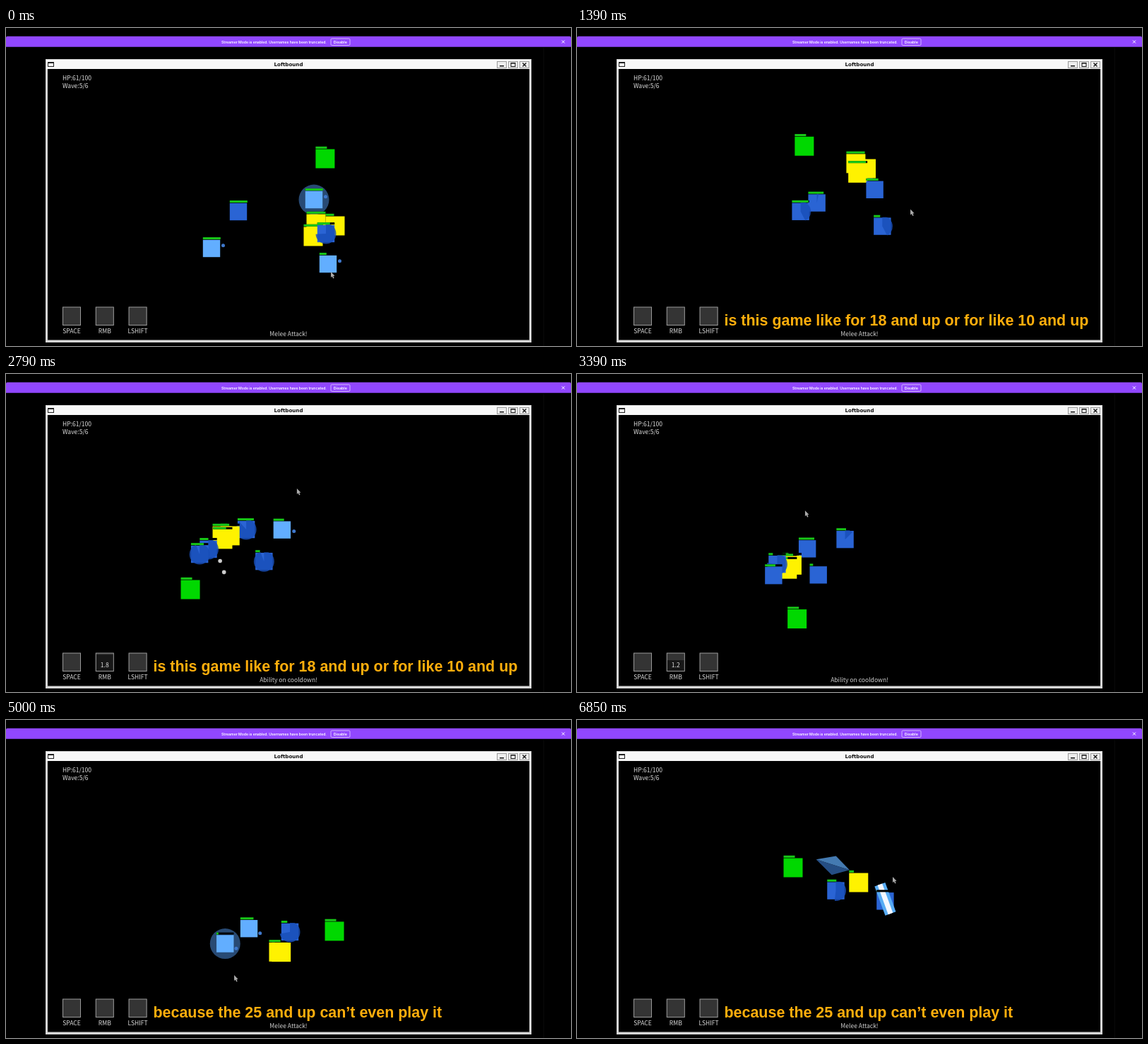
Recreate the animation shown at these times as an HTML page with a canvas. Size 800x450 px, loop 6880 ms.

```html
<!DOCTYPE html>
<html lang="en">
<head>
<meta charset="utf-8">
<title>Arena fight</title>
<style>
html, body { margin: 0; width: 100%; height: 100%; overflow: hidden; background: #000; }
canvas { display: block; width: 800px; height: 450px; }
</style>
</head>
<body>
<canvas id="stage" width="800" height="450"></canvas>
<script>
const ctx = document.getElementById('stage').getContext('2d');
const LOOP = 6880, STEP = 10;
const HUD = '8.55px "Noto Sans CJK JP", "Noto Sans CJK SC", "Noto Sans", sans-serif';
const BLUE = '#2a64d4', LIGHT = '#62aeff', YELLOW = '#fff200', GREEN = '#00d800';

// Attack cycle of a blue enemy: fire, reload, advance, halt. Times in ms.
const CYCLE = 5050, FIRE = 500, RELOAD = 2700, HALT = 4500;
const STAGGER = 700;
const CAST = 2620, COOLDOWN = 2000;
const SWING_EVERY = 990, SWING_TIME = 130;

// Steered by hand: time and centre.
const player = [[0, 452, 185], [910, 372, 143], [1940, 273, 215], [2790, 261, 305],
  [4120, 389, 371], [5000, 465, 299], [5900, 460, 190], [6850, 306, 209]];
const mouse = [[0, 460, 345], [910, 473, 303], [1940, 462, 202], [2790, 412, 162],
  [4120, 234, 256], [5000, 323, 361], [6850, 447, 222]];

// Enemies chase the player from a start point, losing health until they die at `end`.
const yellow = (x, y, hp, end) => ({ x, y, hp, end, size: 27, speed: .074 });
const blue = (x, y, hp, end, offset) => ({ x, y, hp, end, offset, size: 24.4, speed: .052 });
const enemies = [
  blue(436, 243, 25, 9900, 100),
  yellow(466, 280, 12, 6300),
  yellow(439, 277, 27, 7900),
  yellow(435, 295, 27, 4900),
  blue(329, 260, 25, 3900, 4240),
  blue(291, 312, 25, 5300, 250),
  blue(453, 291, 18, LOOP, 2500),
  blue(456, 334, 10, 4700, 250)
];
const captions = [
  [450, 3350, 'is this game like for 18 and up or for like 10 and up'],
  [4500, LOOP, 'because the 25 and up can’t even play it']
];

// Smooth curve through the key points.
function along(keys, t) {
  let i = 0;
  while (i < keys.length - 2 && t >= keys[i + 1][0]) i++;
  const d = keys[i + 1][0] - keys[i][0], u = Math.min(1, (t - keys[i][0]) / d), w = 1 - u;
  const slope = (j, axis) => {
    const a = keys[Math.max(j - 1, 0)], b = keys[Math.min(j + 1, keys.length - 1)];
    return (b[axis] - a[axis]) / (b[0] - a[0]);
  };
  return [1, 2].map(axis =>
    keys[i][axis] * w * w * (1 + 2 * u) + keys[i + 1][axis] * u * u * (3 - 2 * u)
    + d * u * w * (slope(i, axis) * w - slope(i + 1, axis) * u));
}

const clock = (e, t) => (t + e.offset) % CYCLE;

function isStill(e, t) {
  if (t > e.end - STAGGER) return true;
  return 'offset' in e && (clock(e, t) < FIRE || clock(e, t) > HALT);
}

for (const e of enemies) {
  let { x, y } = e;
  e.path = [];
  for (let t = 0; t < LOOP; t += STEP) {
    e.path.push([x, y]);
    if (isStill(e, t)) continue;
    const [px, py] = along(player, t);
    const move = e.speed * STEP / Math.hypot(px - x, py - y);
    x += (px - x) * move;
    y += (py - y) * move;
  }
}

function rect(x, y, w, h, color) {
  ctx.fillStyle = color;
  ctx.fillRect(x, y, w, h);
}

function square(x, y, size, color) {
  rect(x - size / 2, y - size / 2, size, size, color);
}

function outline(x, y, w, h, color) {
  ctx.strokeStyle = color;
  ctx.strokeRect(x, y, w, h);
}

function circle(x, y, r, color) {
  ctx.fillStyle = color;
  ctx.beginPath();
  ctx.arc(x, y, r, 0, 7);
  ctx.fill();
}

function poly(points, color) {
  ctx.fillStyle = color;
  ctx.beginPath();
  points.forEach(p => ctx.lineTo(...p));
  ctx.fill();
}

function cross(x, y, r, color) {
  ctx.strokeStyle = color;
  ctx.beginPath();
  for (const s of [-r, r]) {
    ctx.moveTo(x - r, y - s);
    ctx.lineTo(x + r, y + s);
  }
  ctx.stroke();
}

function text(str, x, y, font, color, align = 'left') {
  ctx.font = font;
  ctx.fillStyle = color;
  ctx.textAlign = align;
  ctx.fillText(str, x, y);
}

function placed(x, y, angle, paint) {
  ctx.save();
  ctx.translate(x, y);
  ctx.rotate(angle);
  paint();
  ctx.restore();
}

function healthBar(x, y, size, width) {
  const left = x - size / 2, top = y - size / 2 - 3.7;
  rect(left, top, size, 3, '#000');
  rect(left, top, width, 3, '#18c818');
}

function drawBanner() {
  ctx.fillStyle = '#9147ff';
  ctx.beginPath();
  ctx.roundRect(0, 11.7, 800, 15, [2, 2, 0, 0]);
  ctx.fill();
  text('Streamer Mode is enabled. Usernames have been truncated.', 379.5, 21.7, '600 5.1px Inter, sans-serif', '#fff', 'center');
  text('Disable', 473.3, 21.7, '600 5.4px Inter, sans-serif', '#fff', 'center');
  ctx.lineWidth = .8;
  ctx.strokeStyle = '#e4d4ff';
  ctx.beginPath();
  ctx.roundRect(460, 15, 27, 9.5, 1.5);
  ctx.stroke();
  ctx.lineWidth = 1;
  cross(789, 19.5, 2, '#fff');
}

function drawWindow() {
  rect(761, 28, 1, 422, '#0a0a0a');
  rect(56, 44, 688, 401, '#d6d6d6');
  rect(57, 45, 686, 13, '#f8f8f8');
  rect(59, 58, 682, 383.5, '#000');
  text('Loftbound', 400, 53.6, 'bold 7.1px "DejaVu Sans", sans-serif', '#111', 'center');
  outline(59.5, 48.5, 8, 6, '#222');
  rect(59, 48, 9, 2, '#222');
  for (const x of [695.5, 711.5, 727.5]) {
    rect(x, 47.5, 13, 9, '#eee');
    outline(x, 47.5, 13, 9, '#999');
  }
  rect(699, 53, 6, 1.5, '#111');
  outline(715, 49.5, 6, 5, '#111');
  rect(715, 49, 6, 1.5, '#111');
  ctx.lineWidth = 1.4;
  cross(734, 52, 2.5, '#111');
  ctx.lineWidth = 1;
}

function drawHud(t) {
  const ink = '#e0e0e0', wait = t > CAST ? CAST + COOLDOWN - t : 0;
  text('HP:61/100', 80, 74, HUD, ink);
  text('Wave:5/6', 80, 84.7, HUD, ink);
  ['SPACE', 'RMB', 'LSHIFT'].forEach((name, i) => {
    const x = 80 + i * 46.8;
    rect(x, 395, 26, 26, '#343434');
    if (name === 'RMB' && wait > 0) {
      const shade = 26 * wait / COOLDOWN;
      rect(x, 421 - shade, 26, shade, '#171717');
      text((wait / 1000).toFixed(1), x + 13, 415, HUD, ink, 'center');
    }
    outline(x + .5, 395, 25, 25.5, '#999');
    text(name, x + 13, 431.8, HUD, ink, 'center');
  });
  const message = t > CAST && t < CAST + 800 ? 'Ability on cooldown!' : 'Melee Attack!';
  text(message, 400, 436.3, HUD, '#d0d0d0', 'center');
}

function drawBlue(e, x, y, t) {
  const s = clock(e, t), reload = (s - FIRE) / RELOAD;
  if (s > 60 && s < 220) circle(x, y, 21.5, '#284a74');
  square(x, y, e.size, s < FIRE ? LIGHT : BLUE);
  if (s < FIRE) {
    const a = t * .00013 - .25;
    circle(x + 17 * Math.cos(a), y + 17 * Math.sin(a), 2.5, '#3f78cc');
  } else if (reload < 1) {
    ctx.fillStyle = 'rgba(24,78,184,.82)';
    ctx.beginPath();
    ctx.moveTo(x, y);
    ctx.arc(x, y, 14.5, -Math.PI / 2, (2 * reload - .5) * Math.PI);
    ctx.fill();
  }
}

function drawBlade(x, y) {
  placed(x, y - 3, -.35, () => {
    rect(-8, -22, 16, 44, '#58acf4');
    rect(-3.5, -22, 7, 44, '#f4f8ff');
  });
}

function drawEnemy(e, t) {
  if (t >= e.end) return;
  const [x, y] = e.path[Math.floor(t / STEP)];
  if ('offset' in e) drawBlue(e, x, y, t);
  else square(x, y, e.size, YELLOW);
  if (t > e.end - 110) drawBlade(x, y);
  healthBar(x, y, e.size, e.hp * (1 - (t / e.end) ** 2));
}

function aimAt(t) {
  const [x, y] = along(player, t), [mx, my] = along(mouse, t);
  return [x, y, Math.atan2(my - y, mx - x)];
}

function drawShots(t) {
  const age = t - CAST;
  if (age < 0 || age > 700) return;
  const [x, y, aim] = aimAt(CAST);
  for (const spread of [.15, .46])
    circle(x + .32 * age * Math.cos(aim + spread), y + .32 * age * Math.sin(aim + spread), 2.8, '#ccc');
}

function drawSwing(t) {
  const u = (t + 140) % SWING_EVERY / SWING_TIME;
  if (u >= 1) return;
  const [x, y, aim] = aimAt(t);
  placed(x, y, aim + (u - .6) * .4, () => {
    ctx.globalAlpha = .85;
    poly([[32, -13], [60, -19], [80, 0]], '#5090d0');
    poly([[32, -13], [80, 0], [55, 8]], '#2c5c9c');
  });
}

function drawCursor(x, y) {
  placed(x, y, 0, () =>
    poly([[0, 0], [0, 8], [1.8, 6.5], [3.2, 9.5], [4.6, 8.8], [3.3, 6], [5.5, 5.8]], '#aaa'));
}

function drawCaption(t) {
  for (const [from, to, line] of captions) {
    if (t >= from && t < to)
      text(line, 208.5, 420.5, 'bold 21.45px "Liberation Sans", Arial, sans-serif', '#ffae0c');
  }
}

function draw(t) {
  rect(0, 0, 800, 450, '#000');
  drawBanner();
  drawWindow();
  enemies.forEach(e => drawEnemy(e, t));
  const [x, y] = along(player, t);
  square(x, y, 27, GREEN);
  healthBar(x, y, 27, 16);
  drawShots(t);
  drawSwing(t);
  drawHud(t);
  drawCursor(...along(mouse, t));
  drawCaption(t);
}

const begin = performance.now();
function tick() {
  draw((performance.now() - begin) % LOOP);
  requestAnimationFrame(tick);
}
tick();
</script>
</body>
</html>
```
